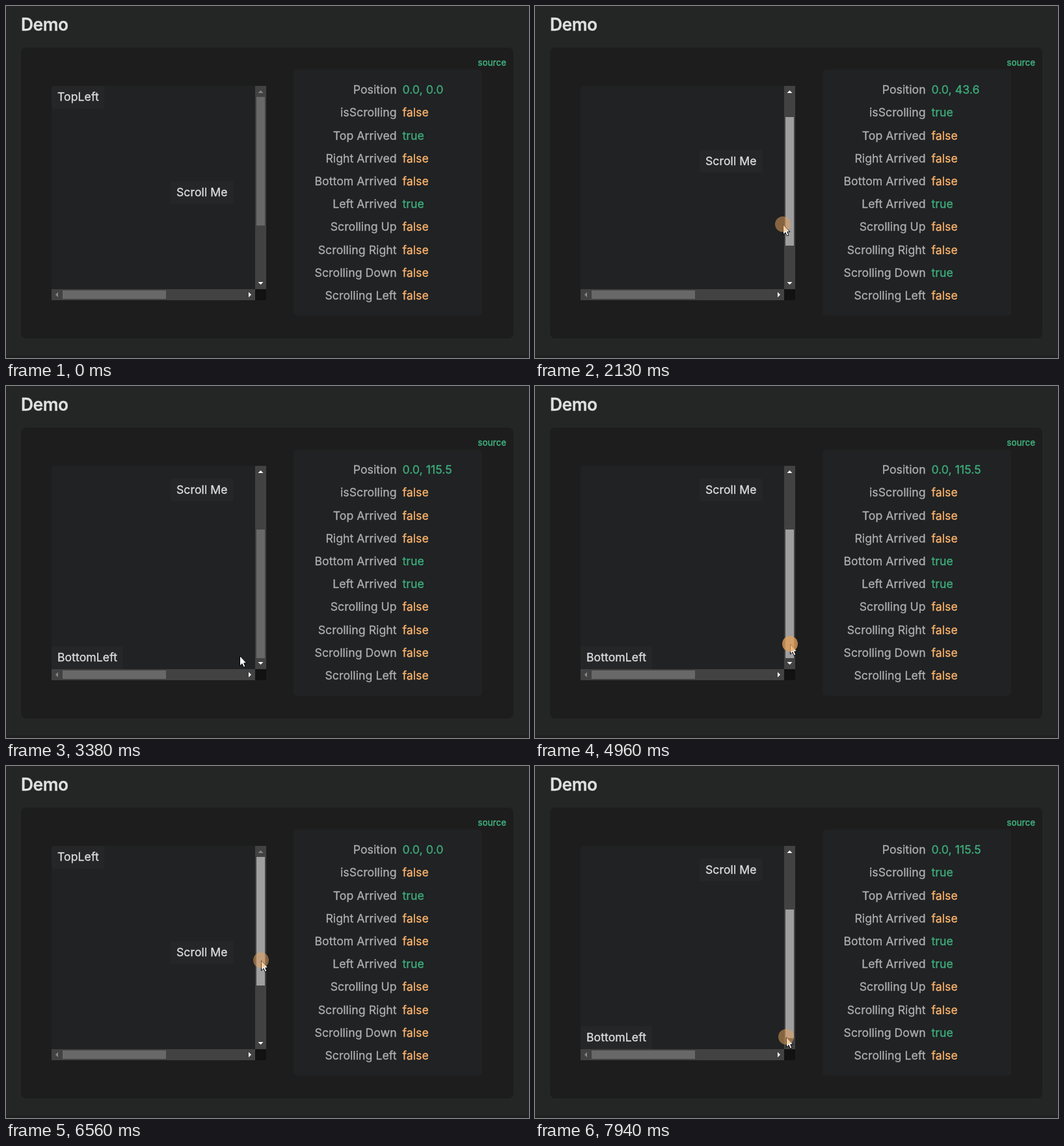
An HTML page with a canvas for the animation above (8 s loop, 804 by 542 pixels).

```html
<!DOCTYPE html>
<html lang="en">
<head>
<meta charset="utf-8">
<title>Scroll demo</title>
<style>
  html, body { margin: 0; width: 100%; height: 100%; overflow: hidden; background: #242625; }
  canvas { display: block; }
</style>
</head>
<body>
<canvas id="stage" width="804" height="542"></canvas>
<script>
const ctx = document.getElementById('stage').getContext('2d');
const LOOP = 8000;
const ZOOM = 1.1;
const IDLE = 230;

// Scroll area and its bars
const LEFT = 70, TOP = 123, VIEW = 313, BAR = 17;
const CONTENT_W = 500 * ZOOM, CONTENT_H = 400 * ZOOM;
const TRACK = VIEW - 2 * BAR;
const thumbLength = content => Math.round(TRACK * VIEW / content);
const MAX_SCROLL = CONTENT_H - VIEW;
const TRAVEL = TRACK - thumbLength(CONTENT_H);

const TEXT = '#dfdfdf', LABEL = '#afb0b0', GREEN = '#3eaf7c', ORANGE = '#fdb46c';
const SURFACE = '#202224', BADGE = '#252628', TRACK_COLOR = '#424242', THUMB = '#686868';
const BODY_FONT = '17.6px Inter, sans-serif';

const linear = k => k;
const easeOut = k => 1 - (1 - k) ** 3;
const accelerate = power => k => k ** power;

// Pointer moves; while dragging, the scroll position follows
const ENTRY = { x: 722, y: 530 };
const MOVES = [
  { from: 460, to: 1640, x: 392, y: 305, ease: easeOut },
  { from: 1680, to: 2690, x: 367, y: 374, ease: linear, drag: true },
  { from: 2690, to: 3180, x: 359, y: 415, ease: linear, drag: true },
  { from: 3380, to: 3790, x: 248, y: 390, ease: linear },
  { from: 3990, to: 4760, x: 392, y: 397, ease: linear },
  { from: 5030, to: 6480, x: 392, y: 299, ease: accelerate(1.3), drag: true },
  { from: 6890, to: 7940, x: 386, y: 417, ease: accelerate(1.8), drag: true }
];
const PRESSES = [{ from: 1600, to: 3380 }, { from: 4830, to: LOOP }];

const clamp = (v, lo, hi) => Math.min(hi, Math.max(lo, v));

function stateAt(t) {
  let { x, y } = ENTRY, scroll = 0;
  for (const move of MOVES) {
    if (t < move.from) break;
    const k = move.ease(clamp((t - move.from) / (move.to - move.from), 0, 1));
    const dy = (move.y - y) * k;
    x += (move.x - x) * k;
    y += dy;
    if (move.drag) scroll = clamp(scroll + dy / TRAVEL * MAX_SCROLL, 0, MAX_SCROLL);
  }
  return { x, y, scroll: Math.round(scroll), visible: t >= MOVES[0].from };
}

function rect(x, y, w, h, color, r = 0) {
  ctx.fillStyle = color;
  ctx.beginPath();
  ctx.roundRect(x, y, w, h, r);
  ctx.fill();
}

// A hairline stroke gives the letters a slightly fuller weight
function text(str, x, y, color, { font = BODY_FONT, align = 'left', spacing = 0.08 } = {}) {
  ctx.font = font;
  ctx.letterSpacing = spacing + 'px';
  ctx.textAlign = align;
  ctx.fillStyle = ctx.strokeStyle = color;
  ctx.lineWidth = 0.3;
  ctx.fillText(str, x, y);
  ctx.strokeText(str, x, y);
}

function polygon(points) {
  ctx.beginPath();
  points.forEach(([x, y]) => ctx.lineTo(x, y));
  ctx.closePath();
}

function clipRect(x, y, w, h, r = 0) {
  ctx.beginPath();
  ctx.roundRect(x, y, w, h, r);
  ctx.clip();
}

function arrow(x, y, turns, active) {
  ctx.save();
  ctx.translate(x, y);
  ctx.rotate(turns * Math.PI / 2);
  polygon([[-4, 2], [0, -2], [4, 2]]);
  ctx.fillStyle = active ? '#ffffff' : '#868686';
  ctx.fill();
  ctx.restore();
}

function badge(str, x, y) {
  ctx.font = BODY_FONT;
  rect(x, y, ctx.measureText(str).width + 18, 35.2, BADGE, 3);
  text(str, x + 9, Math.round(y + 23.3), TEXT);
}

function drawScroller(scroll, thumbColor) {
  const right = LEFT + VIEW, bottom = TOP + VIEW;
  const midX = right + BAR / 2, midY = bottom + BAR / 2;
  const thumbY = TOP + BAR + Math.round(scroll / MAX_SCROLL * TRAVEL);

  ctx.save();
  clipRect(LEFT, TOP, VIEW, VIEW, [4, 0, 0, 0]);
  rect(LEFT, TOP, VIEW, VIEW, SURFACE);
  ctx.translate(0, -scroll);
  badge('TopLeft', LEFT, TOP);
  badge('Scroll Me', 253, 269.4);
  badge('BottomLeft', LEFT, TOP + CONTENT_H - 35.2);
  ctx.restore();

  rect(right, TOP, BAR, VIEW, TRACK_COLOR);
  rect(LEFT, bottom, VIEW, BAR, TRACK_COLOR);
  rect(right, bottom, BAR, BAR, '#121212');
  rect(right + 2, thumbY, 13, thumbLength(CONTENT_H), thumbColor);
  rect(LEFT + BAR, bottom + 2, thumbLength(CONTENT_W), 13, THUMB);
  arrow(midX, TOP + 9, 0, scroll > 0);
  arrow(midX, bottom - 9, 2, scroll < MAX_SCROLL);
  arrow(LEFT + 8, midY, 3, false);
  arrow(right - 8, midY, 1, true);
}

function drawReadout(scroll, delta) {
  const rows = {
    'Position': '0.0, ' + (scroll / ZOOM).toFixed(1),
    'isScrolling': delta !== 0,
    'Top Arrived': scroll === 0,
    'Right Arrived': false,
    'Bottom Arrived': scroll >= Math.round(MAX_SCROLL),
    'Left Arrived': true,
    'Scrolling Up': delta < 0,
    'Scrolling Right': false,
    'Scrolling Down': delta > 0,
    'Scrolling Left': false
  };
  rect(442, 98, 290, 379, SURFACE, 5);
  Object.entries(rows).forEach(([label, value], i) => {
    const y = Math.round(135.2 + 35.2 * i);
    text(label, 600.6, y, LABEL, { align: 'right' });
    text(String(value), 609.4, y, value ? GREEN : ORANGE);
  });
}

function drawPointer(x, y, press, t) {
  ctx.save();
  ctx.translate(Math.round(x), Math.round(y));
  polygon([[0.5, 0.5], [0.5, 16], [4, 12.7], [6.4, 18], [9, 17], [6.7, 11.8], [11, 11.8]]);
  ctx.fillStyle = '#ffffff';
  ctx.fill();
  ctx.lineWidth = 1;
  ctx.strokeStyle = '#000000';
  ctx.stroke();
  if (press) {
    const fresh = clamp(1 - (t - press.from) / 500, 0, 1);
    ctx.fillStyle = `rgba(228, 161, 90, ${0.52 + 0.33 * fresh})`;
    ctx.beginPath();
    ctx.arc(0, 0, 12, 0, Math.PI * 2);
    ctx.fill();
  }
  ctx.restore();
}

function draw(t) {
  const { x, y, scroll, visible } = stateAt(t);
  const delta = scroll - stateAt(t - IDLE).scroll;
  const press = PRESSES.find(p => t >= p.from && t < p.to);
  const dragging = press && t - press.from > 60;
  const hover = visible && x >= 385 && x < 398;
  const thumbColor = dragging ? '#9f9f9f' : hover ? '#7b7b7b' : THUMB;

  rect(0, 0, 804, 542, '#242625');
  rect(0, 538, 804, 4, '#1f2020');
  text('Demo', 23, 38, TEXT, { font: '600 26.4px Inter, sans-serif', spacing: -0.5 });
  rect(23, 64, 757, 448, '#1d1d1d', 8);
  text('source', 769, 92, GREEN, { font: '500 13.2px Inter, sans-serif', align: 'right' });
  drawScroller(scroll, thumbColor);
  drawReadout(scroll, delta);
  if (visible) drawPointer(x, y, press, t);
}

const start = performance.now();
function tick() {
  draw((performance.now() - start) % LOOP);
  requestAnimationFrame(tick);
}
tick();
</script>
</body>
</html>
```
